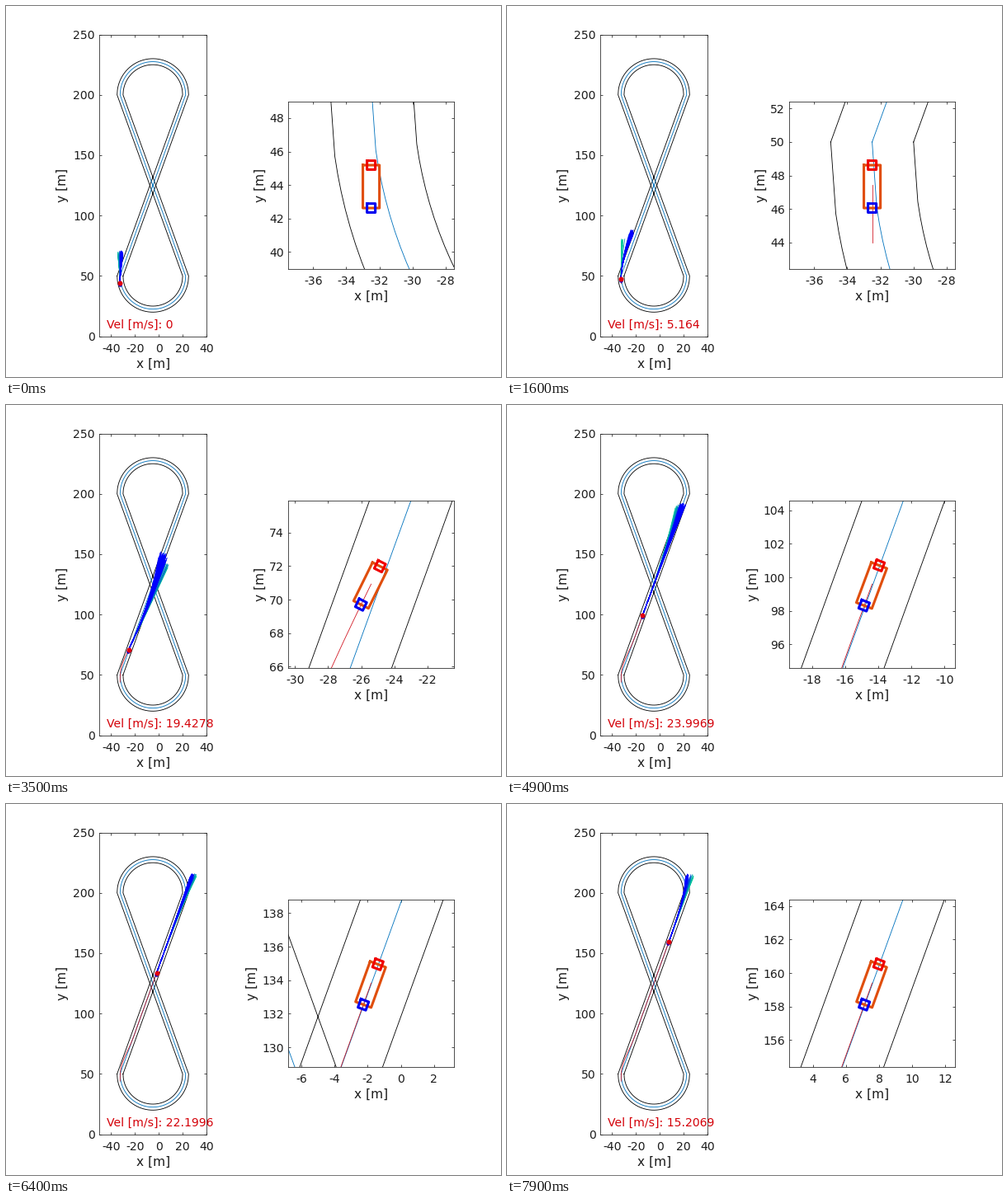
Animation, 600 px wide and 450 px high, one loop 8000 ms. Source, as a matplotlib script:

```python
import numpy as np
import matplotlib.pyplot as plt
from matplotlib.animation import FuncAnimation
from matplotlib.collections import LineCollection
from matplotlib.ticker import MultipleLocator

W, H = 600, 450
FRAMES, STEP = 80, 0.1
PX = 0.72  # points per pixel at 100 dpi
PATHS = 90
INK, DARK, RED, BLUE, ORANGE = "#1c1c1c", "#262626", "#f00000", "#0000f0", "#e04e0c"

plt.rcParams.update({
    "font.family": "DejaVu Sans",
    "font.size": 14 * PX,
    "axes.unicode_minus": False,
    "axes.linewidth": 0.8 * PX,
    "axes.edgecolor": DARK,
})

# Key points of the drive: time, position, speed, sideways miss of the worst path
T = np.array([0, 1.6, 2.4, 3.5, 4.9, 6.4, 7.9])
X = np.array([-32.5, -32.5, -31.73, -25.4, -14.37, -1.79, 7.58])
Y = np.array([44, 47.43, 54.8, 70.93, 99.6, 133.83, 159.4])
V = np.array([0, 5.164, 11.4737, 19.4278, 23.9969, 22.1996, 15.2069])
MISS = np.array([-3, -8, -11.5, 3, -4.5, 3.5, 5])


def hermite(t, val, slope):
    i = np.clip(np.searchsorted(T, t, side="right") - 1, 0, len(T) - 2)
    h = T[i + 1] - T[i]
    s = (t - T[i]) / h
    return ((2 * s**3 - 3 * s**2 + 1) * val[i] + (s**3 - 2 * s**2 + s) * h * slope[i]
            + (3 * s**2 - 2 * s**3) * val[i + 1] + (s**3 - s**2) * h * slope[i + 1])


def heading(t):
    """Straight up at first, then a damped swing onto the straight."""
    s = np.maximum(t - 1.6, 0)
    return np.radians(69.86 + 20.14 * np.exp(-0.25 * s**2) * np.cos(1.3 * s))


ACC = np.gradient(V, T, edge_order=2)
# The displayed speed lags the motion by one step
GROUND = np.where(T > 0, V + STEP * ACC, 0)
VX, VY = GROUND * np.cos(heading(T)), GROUND * np.sin(heading(T))


def bell(t, centre, width):
    return np.exp(-((t - centre) / width) ** 2)


def draw_track(ax):
    """Each line is one closed figure eight: wide at one end, tight at the other."""
    a = np.radians(np.r_[0, np.linspace(8.2, 171.8, 80), 180])
    for off, color in ((2.5, "k"), (-2.5, "k"), (0, "#0072bd")):
        low, top = 27.5 + off, 27.5 - off
        x = np.r_[-5 - low * np.cos(a), -5 - top * np.cos(a)]
        y = np.r_[50 - low * np.sin(a), 200 + top * np.sin(a)]
        ax.plot(np.r_[x, x[0]], np.r_[y, y[0]], color=color, lw=0.85 * PX, zorder=2)


def box(centre, length, width, u):
    n = np.array([-u[1], u[0]])
    c = np.array([[1, 1], [1, -1], [-1, -1], [-1, 1], [1, 1]]) / 2
    return (centre + c[:, :1] * length * u + c[:, 1:] * width * n).T


def make_axes(left, top, right, bottom):
    ax = fig.add_axes([left / W, 1 - bottom / H, (right - left) / W, (bottom - top) / H])
    ax.tick_params(direction="in", top=True, right=True, length=3 * PX,
                   width=0.8 * PX, color=DARK, labelcolor=INK)
    ax.tick_params(axis="x", pad=8.5 * PX)
    ax.tick_params(axis="y", pad=5.3 * PX)
    draw_track(ax)
    return ax


def label(x, y, s, **kw):
    return fig.text(x / W, 1 - y / H, s, size=15.4 * PX, color=INK,
                    ha="center", va="center", **kw)


def fan_lines(k, t, pos, u, speed):
    """Sampled paths bending from the car towards the straight ahead."""
    rng = np.random.default_rng(100 + k)
    tip_y = min(pos[1] + 24 + 2.75 * speed, 213)
    ahead = -32.5 + (tip_y - 50) * 55 / 150
    tip_x = pos[0] + (ahead - pos[0]) * min(1, 0.2 + 0.3 * t) - 3 * max(0, t - 6.4)

    sharp = 3 + 50 * bell(t, 2, 0.6)
    q = np.clip(0.5 + sharp * (np.linspace(1, 0, PATHS) - 0.78), 0, 1)
    tip = np.c_[tip_x + np.interp(t, T, MISS) * q,
                tip_y - 14 * bell(t, 2.6, 1.3) * q] - pos
    size = np.hypot(*tip.T)[:, None]
    along = tip / size
    across = np.c_[-along[:, 1], along[:, 0]]

    side = (0.6 + 1.3 * bell(t, 3.6, 1.5)) * (1 - 0.5 * q[:, None])
    jitter = np.clip(rng.normal(size=(2, PATHS, 1)), -2, 1.7)
    tip = tip + across * side * jitter[0] + along * 1.7 * jitter[1]
    ctrl = size * (0.3 + 0.05 * t) * u
    s = np.linspace(0, 1, 20)[None, :, None]
    return pos + 2 * s * (1 - s) * ctrl[:, None] + s**2 * tip[:, None], plt.cm.winter(0.8 * q)


fig = plt.figure(figsize=(W / 100, H / 100), dpi=100, facecolor="white")

full = make_axes(113, 34.6, 243, 400.6)
full.set(xlim=(-50, 40), ylim=(0, 250), xticks=range(-40, 41, 20), yticks=range(0, 251, 50))
label(178.5, 434, "x [m]")
label(68.5, 217, "y [m]", rotation=90)

near = make_axes(342.2, 115.6, 543, 318.8)
near.xaxis.set_major_locator(MultipleLocator(2))
near.yaxis.set_major_locator(MultipleLocator(2))
label(443, 352.5, "x [m]")
near_y = label(308, 217, "y [m]", rotation=90)

fan = full.add_collection(LineCollection([], linewidths=0.8 * PX, zorder=3), autolim=False)
trails = [ax.plot([], [], color="#d0101c", lw=0.8 * PX, zorder=2.5)[0] for ax in (full, near)]
body, rear, front = (near.plot([], [], color=c, lw=3.1 * PX, zorder=5 + i, snap=False)[0]
                     for i, c in enumerate((ORANGE, BLUE, RED)))
rear_dot, = full.plot([], [], "o", color="#1800c0", ms=4.6 * PX, mew=0, zorder=5)
car_dot, = full.plot([], [], "o", color="#e00010", ms=6 * PX, mew=0, zorder=6)
speed_text = fig.text(122 / W, 1 - 391 / H, "", size=14 * PX, color="#d40008",
                      ha="left", va="baseline")


def update(k):
    t = k * STEP
    past = np.arange(k + 1) * STEP
    xs, ys = hermite(past, X, VX), hermite(past, Y, VY)
    speed = hermite(t, V, ACC)
    pos = np.array([xs[-1], ys[-1]])
    u = np.array([np.cos(heading(t)), np.sin(heading(t))])
    nose, tail = pos + 1.19 * u, pos - 1.37 * u

    for trail in trails:
        trail.set_data(xs, ys)
    body.set_data(*box((nose + tail) / 2, 2.56, 1, u))
    front.set_data(*box(nose, 0.53, 0.5, u))
    rear.set_data(*box(tail, 0.53, 0.5, u))
    rear_dot.set_data([tail[0]], [tail[1]])
    car_dot.set_data([pos[0]], [pos[1]])

    lines, colors = fan_lines(k, t, pos, u, speed)
    fan.set_segments(list(lines))
    fan.set_color(colors)

    near.set_xlim(pos[0] - 5, pos[0] + 5)
    near.set_ylim(pos[1] - 5, pos[1] + 5)
    near_y.set_x((299 if pos[1] + 5 >= 100 else 308) / W)
    value = f"{speed:.4f}".rstrip("0").rstrip(".")
    speed_text.set_text(f"Vel [m/s]: {value}")
    return []


anim = FuncAnimation(fig, update, frames=FRAMES, interval=100, repeat=True,
                     repeat_delay=0, blit=False)
plt.show()
```
